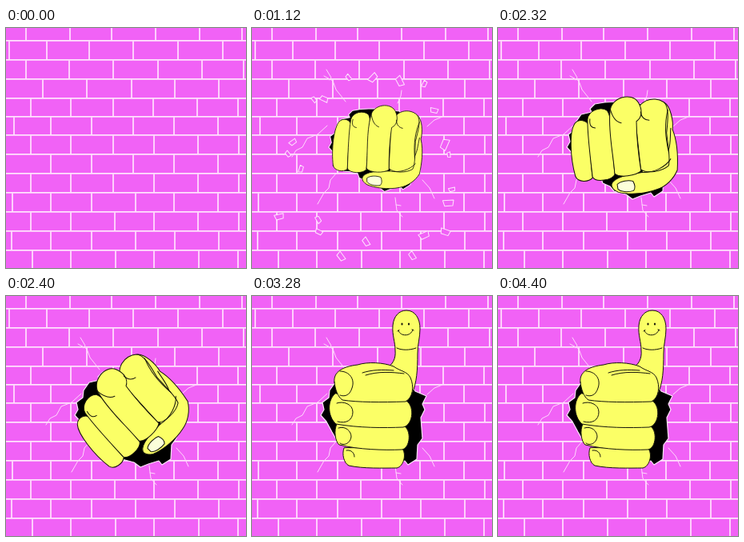
Recreate the animation shown at these times as an HTML page with a canvas. Size 300 by 300 pixels, loop 4480 ms.

```html
<!DOCTYPE html>
<html lang="en">
<head>
<meta charset="utf-8">
<title>Thumbs up</title>
<style>
html, body { margin: 0; height: 100%; overflow: hidden; background: #f162f6; }
canvas { display: block; width: 100vw; height: 100vh; }
</style>
</head>
<body>
<canvas id="stage" width="300" height="300"></canvas>
<script>
const ctx = document.getElementById('stage').getContext('2d');
const LOOP = 4480, PINK = '#f162f6', SKIN = '#fbff66', INK = '#15150a', NAIL = '#fcffda';

const rowEnds = [16, 40, 64, 88, 111, 134, 158, 182, 206, 230, 254, 278, 302];
const joints = [
  [25, 80, 132, 187, 242, 295], [4, 51, 104, 159, 215, 271],
  [25, 79, 134, 190, 245, 297], [46, 101, 157, 211, 266],
  [31, 81, 134, 184, 239, 290], [10, 56, 107, 159, 210, 265],
  [31, 81, 134, 185, 240, 291], [56, 107, 159, 210, 265],
  [31, 81, 134, 185, 240, 291], [8, 56, 107, 162, 210, 265],
  [31, 81, 136, 185, 240, 291], [7, 56, 107, 162, 211, 266],
  [33, 81, 137, 185, 241, 290]
];

const cracks = 'M93 52 L99 62 L97 65 M90 60 L101 66 L105 77 L117 92' +
  'M50 161 L55 153 L63 149 L69 138 L82 133 L94 122' +
  'M238 111 L228 115 L219 123 M187 78 L186 85 L182 94' +
  'M82 220 L90 206 L96 200 L98 190 L105 182' +
  'M188 236 L181 228 L179 212 M180 221 L186 222 M228 213 L222 200 L213 190';

const hole = 'M150 92 L133 93 L121 95 L115 101 L117 105 L104 108 L97 118 L96 127 L88 133' +
  'L90 142 L86 149 L93 157 L100 170 L108 184 L128 186 L131 194 L140 198 L145 204' +
  'L160 208 L168 214 L178 210 L191 206 L195 211 L206 204 L207 186 L213 178 L211 152' +
  'L216 142 L213 135 L218 125 L204 119 L190 96 Z';

const fistParts = [
  'M135 193 C139 184 160 184 175 184 L206 100 L216 102 C223 108 224 126 221 137 ' +
    'C225 154 222 174 219 188 C213 198 202 206 190 208 C172 212 151 208 142 204 C136 200 134 197 135 193 Z',
  'M92 176 C89 152 93 120 101 111 C107 105 118 108 119 118 C116 140 113 160 113 181 C107 186 94 184 92 176 Z',
  'M113 180 C114 152 115 126 118 108 C121 97 137 94 144 101 C147 108 146 112 145 118 L141 181 C137 188 116 188 113 180 Z',
  'M174 180 L177 118 C182 92 205 92 215 101 C222 108 217 125 213 140 C212 158 213 173 209 181 C200 187 180 187 174 180 Z',
  'M141 180 C143 155 141 128 147 104 C150 85 178 82 184 97 C188 107 186 116 178 120 C175 140 174 160 174 182 C167 187 146 187 141 180 Z'
];
const fistLines = 'M148 99 C149 110 153 117 159 119 M185 109 C185 116 189 120 194 121' +
  'M219 112 C213 126 210 143 212 165 M219 135 C216 149 216 154 212 162' +
  'M121 108 C119 116 121 119 126 120 M175 184 C190 187 205 182 213 173';
const fistNail = 'M142 194 C147 190 157 191 162 193 C164 198 164 202 161 205 C153 206 145 204 142 200 Z';

const shortThumb = 'M174 88 C176 79 172 68 176 60 C181 51 194 51 199 57 C204 65 203 77 205 88 C205 101 205 111 200 120 L174 110 Z';
const longThumb = 'M168 90 C176 86 180 78 179 68 C179 57 175 49 176 37 C177 25 184 18 193 18 ' +
  'C204 18 210 28 210 41 C210 52 207 60 207 72 C207 92 206 109 200 122 L172 118 Z';
const thumbNail = 'M175 76 C177 66 195 66 199 74 C203 82 196 90 187 90 C178 90 173 84 175 76 Z';

const handParts = [
  'M115 190 C112 198 115 209 121 212 C139 216 164 215 181 215 C190 213 194 196 187 190 Z',
  'M106 160 C102 168 104 182 109 186 C133 192 165 193 187 192 C198 191 200 166 189 162 Z',
  'M104 122 C94 130 94 150 105 160 C134 165 164 165 189 164 C202 161 204 135 191 130 Z',
  'M103 108 C101 94 115 88 132 86 C145 82 164 83 177 88 C185 94 194 94 198 102 ' +
    'C203 113 201 127 192 132 C162 133 132 133 113 130 C107 126 104 116 103 108 Z'
];
const handLines = 'M138 96 C150 92 163 92 177 93 M142 99 C158 94 174 95 190 97' +
  'M110 94 C122 94 129 104 125 115 C122 125 115 126 110 124' +
  'M106 134 C114 131 126 135 126 145 C126 155 118 160 107 157' +
  'M108 165 C117 162 124 169 124 176 C123 184 115 188 110 184 M118 193 C124 192 128 196 128 201';

function paint(d, fill, line = INK, width = 1) {
  const path = new Path2D(d);
  if (fill) {
    ctx.fillStyle = fill;
    ctx.fill(path);
  }
  ctx.strokeStyle = line;
  ctx.lineWidth = width;
  ctx.stroke(path);
}

function posed(x, y, turn, scale, draw) {
  ctx.save();
  ctx.translate(x, y);
  ctx.rotate(turn * Math.PI / 180);
  ctx.scale(scale, scale);
  ctx.translate(-x, -y);
  draw();
  ctx.restore();
}

function wall() {
  ctx.fillStyle = PINK;
  ctx.fillRect(0, 0, 300, 300);
  let top = 0;
  rowEnds.forEach((end, i) => {
    ctx.fillStyle = '#ffcffd';
    for (const x of joints[i]) ctx.fillRect(x - 1, top, 2, end - top);
    ctx.fillStyle = '#ffe6fd';
    ctx.fillRect(0, end - 1, 300, 1.7);
    top = end;
  });
}

function impact() {
  ctx.strokeStyle = '#ffd5fb';
  ctx.lineWidth = 1.2;
  const arc = (x, y, r, from, to, dash) => {
    ctx.setLineDash(dash);
    ctx.beginPath();
    ctx.arc(x, y, r, from, to);
    ctx.stroke();
  };
  arc(141, 132, 41, -1.9, 4.1, [13, 5, 20, 4]);
  arc(141, 132, 27, 2.1, 4.6, [9, 7]);
  arc(145, 128, 11, -2.4, 1.9, [14, 4]);
  arc(142, 131, 22, -1.2, 1.9, [10, 12]);
  ctx.setLineDash([]);
  paint('M76 133 L88 132 L93 124 M136 188 h2 M141 188 h2 M135 193 h2', null, '#ffd5fb');
}

function debris(k) {
  let seed = 7;
  const rnd = () => (seed = seed * 16807 % 2147483647) / 2147483647;
  rnd();
  for (let i = 0; i < 22; i++) {
    const a = i / 22 * 6.283 + rnd() * .3, far = (24 + rnd() * 24) * k + 40;
    const x = 152 + Math.cos(a) * far;
    const y = Math.max(62, 150 + Math.sin(a) * far + 6 * k * k);
    const r = 3 + rnd() * 5;
    posed(x, y, rnd() * 360 + k * 40, 1, () =>
      paint(`M${x - r} ${y - r * .6} L${x + r} ${y - r * .4} L${x + r * .7} ${y + r * .6} L${x - r * .8} ${y + r * .5} Z`,
        PINK, '#ffe6fd'));
  }
}

function fist(turn, scale) {
  posed(155, 150, turn, scale, () => {
    fistParts.forEach(d => paint(d, SKIN));
    paint(fistLines);
    paint(fistNail, NAIL);
  });
}

function face(turn) {
  posed(192, 42, turn, 1, () => {
    ctx.fillStyle = INK;
    for (const x of [187.5, 196]) {
      ctx.beginPath();
      ctx.ellipse(x, 35, 1.1, 1.5, 0, 0, 7);
      ctx.fill();
    }
    paint('M183 43 C185 51 199 51 201 42 M182 44 L184 42.5 M200 42 L202 43');
  });
}

function hand(t) {
  if (t < 2560) {
    paint(shortThumb, SKIN);
    paint(thumbNail, NAIL);
  } else {
    ctx.save();
    ctx.translate(0, t < 2640 ? 15 : t < 2720 ? -1.5 : 0);
    paint(longThumb, SKIN);
    paint('M181 65 C187 68 197 68 205 65');
    if (t >= 2720) {
      const beat = Math.floor((t - 2880) / 80);
      face(t < 2880 ? 0 : 6 * Math.sin((beat - 5) / 7 * 2 * Math.PI));
    }
    ctx.restore();
  }
  handParts.forEach(d => paint(d, SKIN));
  paint(handLines);
}

function draw(t) {
  wall();
  if (t < 1000) return;
  if (t < 1080) {
    impact();
    if (t >= 1040) paint(cracks, null, '#ffd9fc');
    return;
  }
  const k = Math.floor((t - 1080) / 40);
  const scale = [.55, .85, 1.1, 1.05][k] || 1;
  paint(cracks, null, '#ffd9fc');
  posed(152, 150, 0, Math.min(1, scale), () => paint(hole, '#000', '#ffe6fd', 1.2));
  if (t < 2440) {
    const turn = t < 2320 ? 0 : [-9, -25, -45][Math.floor((t - 2320) / 40)];
    fist(turn, scale);
  } else {
    const turn = t < 2480 ? 22 : t < 2520 ? 8 : 0;
    posed(152, 150, turn, 1, () => hand(t));
  }
  if (t < 1240) debris(k + 1);
}

ctx.lineJoin = ctx.lineCap = 'round';
const start = performance.now();
function tick() {
  draw((performance.now() - start) % LOOP);
  requestAnimationFrame(tick);
}
tick();
</script>
</body>
</html>
```
